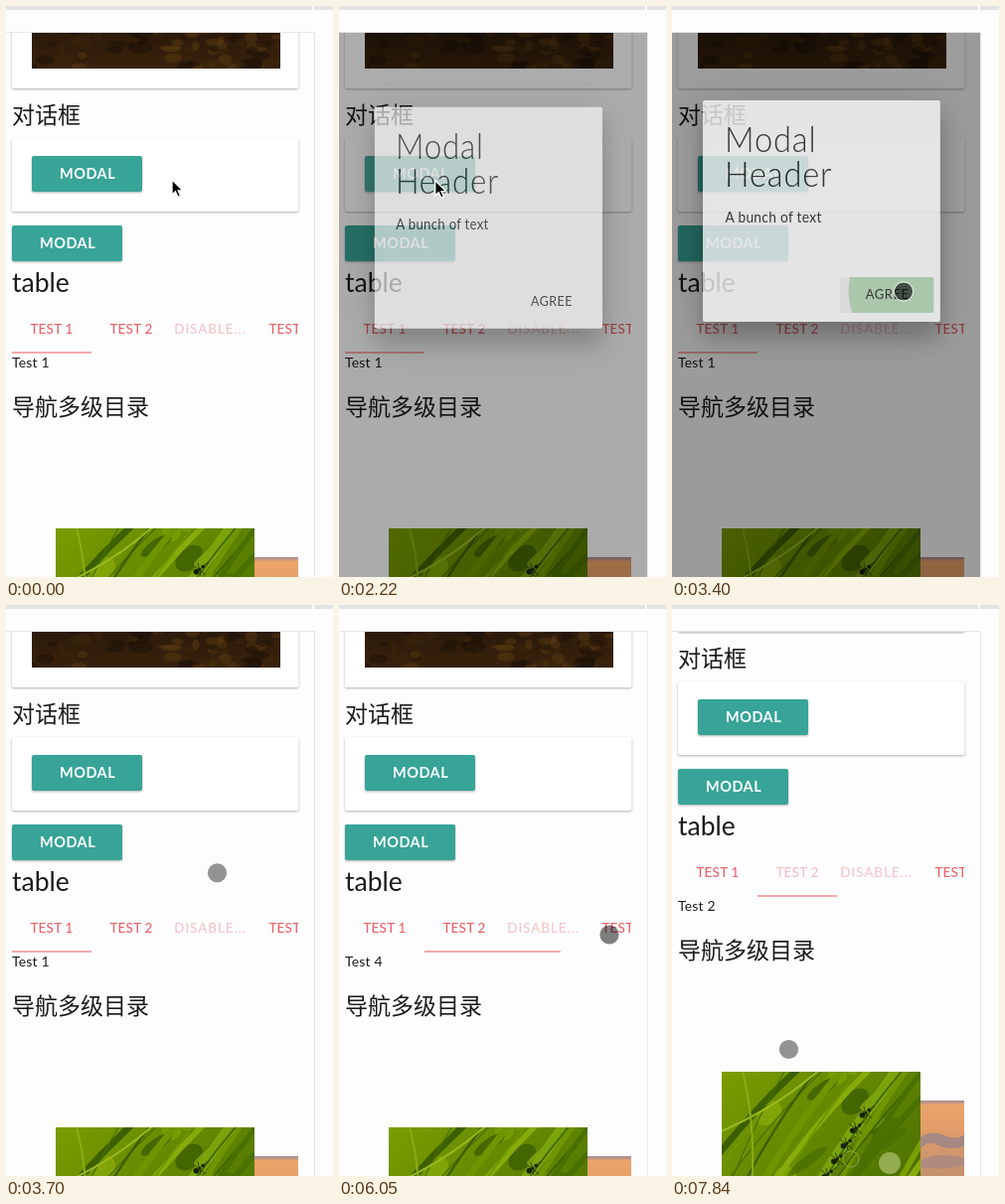
Animation of 329 by 575 pixels, one loop 8000 ms. Source, as an HTML page:

```html
<!DOCTYPE html>
<html lang="zh">
<head>
<meta charset="utf-8">
<title>Modal and tabs</title>
<style>
  html, body { margin: 0; width: 100%; height: 100%; overflow: hidden; background: #fdfdfd; }
  svg { display: block; }
  text { font-family: Lato, "Open Sans", sans-serif; fill: #1c1c1c; }
  .cjk { font: 23px "Noto Sans CJK SC", "Noto Sans CJK", sans-serif; }
  .title { font-size: 26.5px; }
  .body { font-size: 14px; letter-spacing: .2px; }
  .raised { filter: drop-shadow(0 1.5px .9px rgba(0, 0, 0, .3)); }
  .button { fill: #37a497; }
  .label { font-size: 14.5px; font-weight: 700; letter-spacing: .5px; fill: #fff; }
  .tab { font-size: 13.5px; font-weight: 500; letter-spacing: .2px; text-anchor: middle; fill: #e8636a; }
  .heading { font-size: 35px; font-weight: 300; letter-spacing: .9px; }
  .sheet { filter: drop-shadow(0 16px 10px rgba(0, 0, 0, .22)) drop-shadow(0 9px 20px rgba(0, 0, 0, .2)); }
</style>
</head>
<body>
<svg width="329" height="575">
  <defs>
    <clipPath id="view"><rect y="27" width="310" height="548"/></clipPath>
    <clipPath id="tabClip"><rect x="6" y="305" width="288" height="50"/></clipPath>
    <clipPath id="soilClip"><rect x="26" width="250" height="63"/></clipPath>
    <clipPath id="skyClip"><rect x="150" y="555" width="144" height="160"/></clipPath>
    <clipPath id="leafClip"><rect width="200" height="200"/></clipPath>
    <clipPath id="openClip"><rect x="26" y="151" width="111" height="36" rx="2"/></clipPath>
    <clipPath id="agreeClip"><rect x="170.5" y="261" width="101" height="36" rx="2"/></clipPath>
    <linearGradient id="soil" x2="0" y2="1">
      <stop offset=".4" stop-color="#2a190a"/><stop offset="1" stop-color="#3a220c"/>
    </linearGradient>
    <linearGradient id="sky" x2="0" y2="1">
      <stop offset="0" stop-color="#a18a9c"/><stop offset=".03" stop-color="#eca468"/>
      <stop offset=".2" stop-color="#e09c6a"/><stop offset=".4" stop-color="#c8946e"/>
      <stop offset=".6" stop-color="#c08a66"/>
    </linearGradient>
    <linearGradient id="green" x2="1" y2="1">
      <stop offset="0" stop-color="#7a9c00"/><stop offset=".5" stop-color="#5c8200"/>
      <stop offset="1" stop-color="#3d5f00"/>
    </linearGradient>
  </defs>

  <path d="M0 0H308V4H0ZM310 0H329V4H310Z" fill="#e3e3e3"/>
  <path d="M0 26.5H310.5V575" fill="none" stroke="#e6e6e6"/>

  <g clip-path="url(#view)">
    <g id="page">
      <rect class="raised" x="6" y="-20" width="288.5" height="103" rx="2" fill="#fff"/>
      <g id="ground" clip-path="url(#soilClip)"><rect x="26" width="250" height="63" fill="url(#soil)"/></g>
      <text class="cjk" x="6" y="118">对话框</text>
      <rect class="raised" x="6" y="133" width="288.5" height="74" rx="2" fill="#fff"/>
      <rect class="raised button" x="26" y="151" width="111" height="36" rx="2"/>
      <g clip-path="url(#openClip)"><circle id="openRipple" cx="113" cy="166" fill="#fff"/></g>
      <text class="label" x="54" y="174">MODAL</text>
      <rect class="raised button" x="6" y="221" width="111" height="36" rx="2"/>
      <text class="label" x="34" y="244">MODAL</text>
      <text class="title" x="6" y="288">table</text>
      <g clip-path="url(#tabClip)">
        <text class="tab" x="46" y="330">TEST 1</text>
        <text class="tab" x="126" y="330">TEST 2</text>
        <text class="tab" x="205.5" y="330" style="letter-spacing:.9px">DISABLE...</text>
        <text class="tab" x="286" y="330">TEST 4</text>
        <rect id="indicator" y="348" height="2" fill="#f4a9ad"/>
      </g>
      <text class="body" id="panel" x="6" y="364"></text>
      <text class="cjk" x="6" y="412">导航多级目录</text>
      <g clip-path="url(#skyClip)">
        <rect x="150" y="555" width="144" height="160" fill="url(#sky)"/>
        <path d="M250 592Q262 584 274 590T296 588V601Q280 606 268 600T250 604Z" fill="#a58884"/>
        <path d="M250 615Q270 606 296 613V621Q270 626 250 622Z" fill="#b08a7c"/>
      </g>
      <g transform="translate(50 526)" clip-path="url(#leafClip)" id="leaf">
        <rect width="200" height="200" fill="url(#green)"/>
      </g>
    </g>
    <rect id="shade" y="27" width="310" height="548"/>
    <g id="modal">
      <rect class="sheet" x="22.5" y="83" width="256" height="223" rx="2" fill="#fafafa"/>
      <text class="heading" x="46" y="135">Modal</text>
      <text class="heading" x="46" y="170">Header</text>
      <text class="body" x="46.5" y="206" style="font-size:14.8px;letter-spacing:.3px">A bunch of text</text>
      <g clip-path="url(#agreeClip)" id="agreeFill">
        <rect x="170" y="260" width="102" height="38" fill="#000" opacity=".06"/>
        <circle id="agreeRipple" cx="239" cy="275" fill="#4caf50"/>
      </g>
      <text class="body" x="198" y="283" style="letter-spacing:.5px">AGREE</text>
    </g>
  </g>

  <path id="arrow" d="M0 0V15L3.5 11.8 6 17.4 8.6 16.2 6.2 10.8H10.8Z" stroke="#fff" stroke-width="1.3"/>
  <circle id="touch" r="9.6"/>
</svg>

<script>
const $ = id => document.getElementById(id);
const set = (el, attrs) => { for (const name in attrs) el.setAttribute(name, attrs[name]); };
const add = (parent, tag, attrs) => {
  const el = document.createElementNS("http://www.w3.org/2000/svg", tag);
  set(el, attrs);
  parent.append(el);
};
const clamp = x => Math.min(1, Math.max(0, x));
const mix = (a, b, p) => a + (b - a) * p;
const outQuad = x => 1 - (1 - clamp(x)) ** 2;
const outCubic = x => 1 - (1 - clamp(x)) ** 3;
const swing = x => .5 - Math.cos(Math.PI * clamp(x)) / 2;

let seed = 7;
const random = () => (seed = seed * 16807 % 2147483647) / 2147483647;

function paintGround() {
  for (let i = 0; i < 70; i++) {
    add($("ground"), "ellipse", {
      cx: 26 + random() * 250, cy: 22 + random() * 42, rx: 3 + random() * 9, ry: 2 + random() * 4,
      fill: ["#1a0f06", "#5a3a12", "#3c2509"][i % 3], opacity: .5
    });
  }
}

function paintLeaf() {
  const leaf = $("leaf");
  const blade = (d, color, width) => add(leaf, "path", { d, fill: "none", stroke: color, "stroke-width": width });
  const greens = ["#86ab0a", "#4a7000", "#6f9500", "#3c5f00", "#7ba000"];
  for (let i = 0; i < 14; i++) {
    add(leaf, "ellipse", {
      cx: random() * 200, cy: random() * 110, rx: 8 + random() * 18, ry: 4 + random() * 8,
      transform: `rotate(-${30 + random() * 20} 100 55)`, fill: greens[i % 5], opacity: .8
    });
  }
  for (let i = 0; i < 18; i++) {
    const x = random() * 260 - 70, lean = 50 + random() * 70;
    blade(`M${x} 130Q${x + lean * .4} 60 ${x + lean} -5`, greens[i % 5], 1 + random() * 6);
  }
  blade("M-5 62Q60 34 100 -4", "#9aba20", 2);
  blade("M20 -4Q35 50 30 125", "#88ad14", 2);
  blade("M90 125Q130 55 180 -4", "#7ba30c", 9);
  blade("M94 125Q134 55 184 -4", "#456e06", 2);
  add(leaf, "circle", { cx: 169, cy: 92, r: 11, fill: "#93ac50" });
  add(leaf, "circle", { cx: 130, cy: 88, r: 8, fill: "none", stroke: "#8aa640" });
  for (let i = 0; i < 5; i++) {
    const x = 145 - 9.5 * i, y = 41 + 15.5 * i;
    for (const [offset, size] of [[-4, 1.8], [0, 1.5], [4.5, 2.8]]) {
      add(leaf, "circle", { cx: x - offset * .8, cy: y + offset * .6, r: size, fill: "#14200a" });
    }
    blade(`M${x - 7} ${y - 4}L${x + 6} ${y + 6}M${x - 2} ${y - 6}L${x + 1} ${y + 7}M${x + 3} ${y - 3}L${x + 9} ${y - 7}`, "#14200a", .7);
  }
}

// All timings below are in ticks of the stepped clock.
const LOOP = 8000, TICK = 147.8;
const pointerPath = [
  [1, 167, 175], [4, 214, 177], [8, 113, 163], [12, 113, 163], [16, 94, 178], [18, 150, 226],
  [21, 233, 287.5], [23, 233, 287.5], [27, 192, 252], [31, 124, 329], [35, 124, 329],
  [39, 272, 332], [41, 272, 332], [44, 128, 330], [46, 128, 330], [49, 117.5, 447.5]
];
const presses = [[22, 23], [31, 32], [40, 40], [45, 45]];
const tabChanges = [[31.33, 0, 1], [39.6, 1, 3], [44.6, 3, 1]];
const tabLabels = document.querySelectorAll(".tab");
const since = (k, start) => (k - start) * TICK;

function pointerAt(k) {
  const next = pointerPath.findIndex(point => point[0] > k);
  if (next < 0) return pointerPath.at(-1).slice(1);
  if (next === 0) return pointerPath[0].slice(1);
  const [k0, x0, y0] = pointerPath[next - 1], [k1, x1, y1] = pointerPath[next];
  const p = swing((k - k0) / (k1 - k0));
  return [mix(x0, x1, p), mix(y0, y1, p)];
}

function drawPointer(k) {
  const [x, y] = pointerAt(k);
  const isTouch = k >= 20;
  const pressed = presses.some(([from, to]) => k >= from && k <= to);
  const onModal = pressed && k < 25;
  set($("arrow"), { transform: `translate(${x} ${y})`, visibility: isTouch ? "hidden" : "visible" });
  set($("touch"), {
    cx: x, cy: y, visibility: isTouch ? "visible" : "hidden",
    "fill-opacity": onModal ? .6 : pressed ? .5 : .42,
    stroke: onModal ? "#fff" : "none"
  });
}

function drawRipple(el, ms, reach, alpha) {
  set(el, { r: ms > 0 ? reach * outQuad(ms / 500) : 0, opacity: alpha * (1 - clamp((ms - 300) / 300)) });
}

function drawModal(k) {
  const shown = outCubic(since(k, 14.3) / 350) * (1 - swing(since(k, 22.47) / 250));
  $("shade").setAttribute("opacity", shown / 2);
  set($("modal"), {
    opacity: shown,
    transform: `translate(150 ${54 * (1 - shown)}) scale(${.7 + .3 * shown} 1) translate(-150 0)`
  });
  $("agreeFill").setAttribute("visibility", k >= 22 ? "visible" : "hidden");
  drawRipple($("openRipple"), since(k, 11.5), 95, .4);
  drawRipple($("agreeRipple"), since(k, 21.5), 86, .38);
}

function drawTabs(k) {
  const change = tabChanges.filter(([start]) => start <= k).at(-1);
  const [start, from, to] = change || [-99, 0, 0];
  const lead = outQuad(since(k, start) / 300), lag = outQuad((since(k, start) - 90) / 300);
  const left = 6 + 80 * mix(from, to, to > from ? lag : lead);
  const right = 86 + 80 * mix(from, to, to > from ? lead : lag);
  set($("indicator"), { x: left, width: right - left });
  $("panel").textContent = "Test " + (to + 1);
  tabLabels.forEach((label, i) => {
    const hovered = change && i === to && k - start > 1;
    label.setAttribute("opacity", i === 2 ? .36 : hovered ? .4 : 1);
  });
}

function frame() {
  const k = Math.min(53, Math.floor(performance.now() % LOOP / TICK + .05));
  const scroll = k > 52 ? 56 : k === 52 ? 24 : 0;
  $("page").setAttribute("transform", `translate(0 ${-scroll})`);
  drawModal(k);
  drawTabs(k);
  drawPointer(k);
  requestAnimationFrame(frame);
}

paintGround();
paintLeaf();
frame();
</script>
</body>
</html>
```
